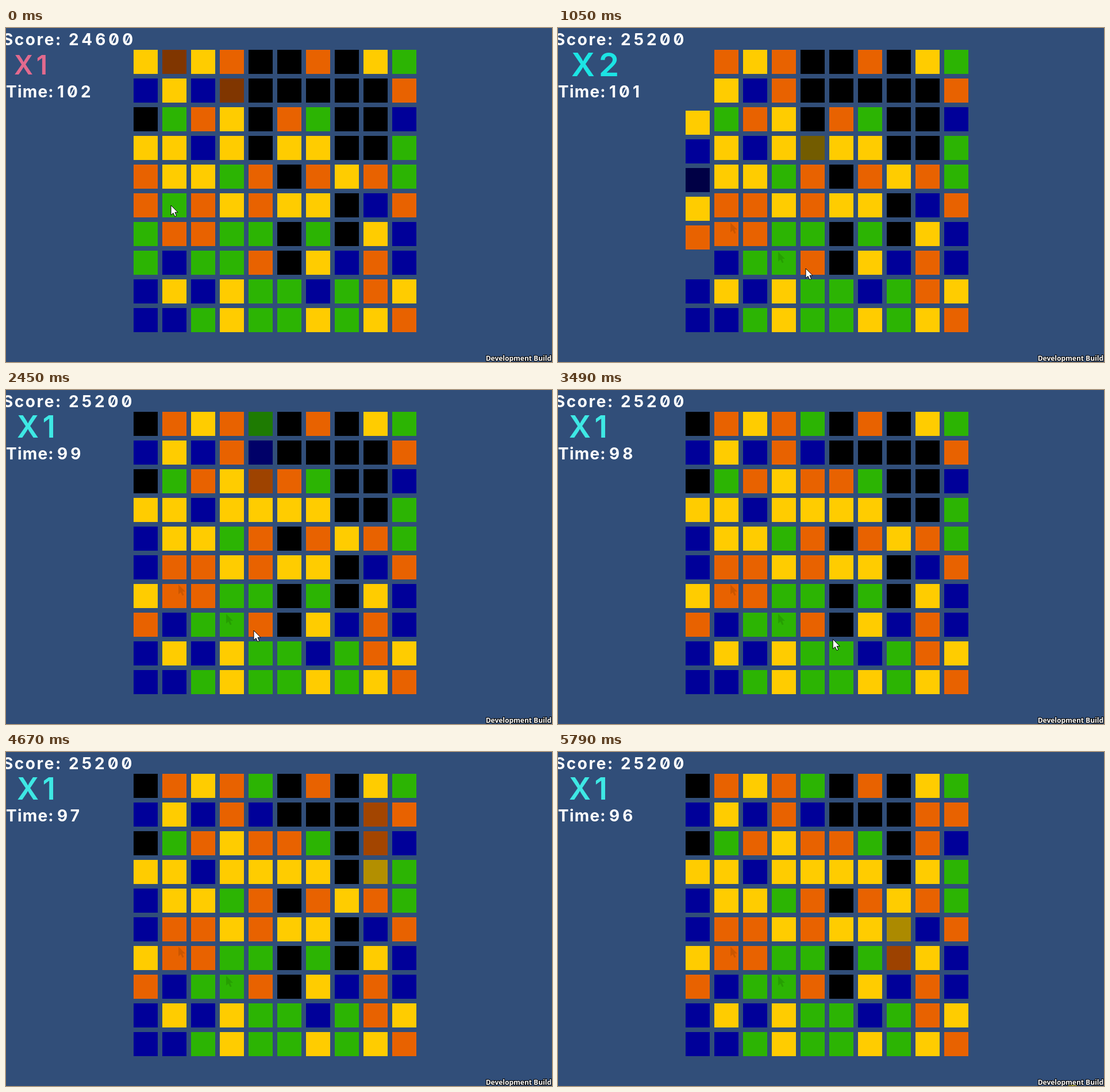
Recreate the animation shown at these times as an HTML page. Size 950x582 px, loop 5920 ms.

```html
<!DOCTYPE html>
<html>
<head>
<meta charset="utf-8">
<style>
  html, body { margin: 0; height: 100%; overflow: hidden; background: #314e79; }
  svg { display: block; width: 950px; height: 582px; }
  text { fill: #fff; font: 700 28px Inter, sans-serif; font-variant-numeric: slashed-zero; white-space: pre; }
  .label { letter-spacing: 2.5px; }
  .number { letter-spacing: 5px; }
  #combo { font-weight: 600; letter-spacing: .12em; }
  #build { font: 700 12px "Open Sans", sans-serif; text-anchor: end; paint-order: stroke; stroke: #000; stroke-width: 2px; }
</style>
</head>
<body>
<svg viewBox="0 0 950 582">
  <defs><path id="arrow" d="M0 0V17L4 13.4 6.8 19.5 9.6 18.3 7 12.2H12Z"/></defs>
  <g id="board"></g>
  <use id="trail1" href="#arrow" x="300" y="339" opacity=".12"/>
  <use id="trail2" href="#arrow" x="383" y="390" opacity=".12"/>
  <text class="label" x="-6" y="30">Score:</text>
  <text class="number" id="score" x="109" y="30"></text>
  <text id="combo"></text>
  <text class="label" x="0" y="121" style="letter-spacing:1.2px">Time:</text>
  <text class="number" id="time" x="89" y="121"></text>
  <circle id="glow" cx="895" cy="588" r="10" fill="#bebe3c"/>
  <text id="build" x="949" y="580">Development Build</text>
  <use id="cursor" href="#arrow" fill="#fff" stroke="#000"/>
</svg>
<script>
const LOOP = 5920, STEPS = 85, FADE = 1.61;
const COLORS = { Y: [255, 204, 0], O: [232, 98, 0], G: [44, 180, 3], B: [0, 0, 153], K: [0, 0, 0] };
const ROWS = [
  "YOYOGKOKYG", "BYBOBKKKOO", "BGOYOOGKOB", "YYBYYYYKYG", "OYYGOKOYOG",
  "OGOYOYYYBO", "GOOGGKGOYB", "GBGGOKYBOB", "BYBYGGBGOY", "BBGYGGYGYO"
];
// Cells that light up from black: start in seconds, first visible step, "column row" list
const FADES = [
  [-0.53, 10, ["1 0", "3 1"]],
  [0.627, 10, ["4 3", "0 2"]],
  [1.737, 31, ["4 0", "4 1", "4 2"]],
  [3.935, 57, ["8 1", "8 2", "8 3"]],
  [5.087, 74, ["7 5", "7 6"]]
];
// Cursor stops: step, x, y
const PATH = [
  [0, 287, 309], [2, 244, 309], [7, 244, 309], [8, 300, 339], [9, 383, 390], [10, 431, 419],
  [49, 431, 419], [54, 667, 495], [57, 667, 495], [60, 825, 561], [62, 868, 585], [85, 868, 600]
];

const $ = id => document.getElementById(id);
const clamp = (v, lo = 0, hi = 1) => Math.min(hi, Math.max(lo, v));
const set = (el, attrs) => { for (const k in attrs) el.setAttribute(k, attrs[k]); };
const show = (id, on) => set($(id), { visibility: on ? "visible" : "hidden" });

function addCell(col, row, letter) {
  const el = document.createElementNS("http://www.w3.org/2000/svg", "rect");
  set(el, { width: 42, height: 42 });
  $("board").append(el);
  const fade = FADES.find(f => f[2].includes(col + " " + row));
  return { el, col, row, color: COLORS[letter], fade };
}

const cells = ROWS.flatMap((line, row) => [...line].map((letter, col) => addCell(col, row, letter)));
const refill = [..."KBK"].map((letter, row) => ({ ...addCell(0, row, letter), fade: null }));

function brightness(fade, step, sec) {
  if (!fade) return 1;
  const [start, first] = fade;
  const u = clamp(((step < first ? 0 : sec) - start) / FADE);
  return 1 - (1 - u) ** 2;
}

function drawCell({ el, col, row, color, fade }, step, sec, dx = 0, dy = 0, opacity = 1) {
  const b = brightness(fade, step, sec);
  set(el, {
    x: 222 + col * 50 + dx, y: 38 + row * 50 + dy, opacity,
    fill: `rgb(${color.map(c => Math.round(c * b))})`
  });
}

function cursorAt(step) {
  const i = PATH.findIndex(p => p[0] > step);
  const [a, x, y] = PATH[i - 1], [b, x2, y2] = PATH[i];
  const u = (step - a) / (b - a);
  return { x: x + (x2 - x) * u, y: y + (y2 - y) * u };
}

function drawCombo(label, x, y, size, fill) {
  $("combo").textContent = label;
  set($("combo"), { x, y, style: `font-size:${size}px;fill:${fill}` });
}

function render(ms) {
  const step = Math.floor(ms % LOOP / LOOP * STEPS);
  const sec = step * LOOP / STEPS / 1000;
  const swap = 50 * clamp((step - 2) / 3);
  const clear = 1 - clamp((step - 6) / 3);
  const fall = step < 11 ? 0 : clamp(14 + 23 * (step - 11), 0, 150);

  for (const cell of cells) {
    const { col, row } = cell;
    const moved = row === 5 && col < 2;
    const matched = col === 0 && (row === 6 || row === 7) || col === 1 && row === 5;
    drawCell(cell, step, sec, moved ? (col ? -swap : swap) : 0,
      col === 0 && row < 5 ? fall : 0, matched ? clear : 1);
  }
  for (const cell of refill) drawCell(cell, step, sec, 0, 0, fall < 150 ? 0 : 1);

  $("score").textContent = step < 6 ? 24600 : 25200;
  $("time").textContent = 102 - Math.floor(sec + 0.8);
  if (step < 6) drawCombo("X1", 14, 81, 46, "#e26a8e");
  else if (step < 28) drawCombo("X2", 23, 84, 57, "#1ce4e4");
  else drawCombo("X1", 19, 83, 53, "#3ee8e4");

  set($("cursor"), cursorAt(step));
  show("trail1", step >= 9);
  show("trail2", step >= 10);
  show("glow", step >= 82);
}

const began = performance.now();
function tick() {
  render(performance.now() - began);
  requestAnimationFrame(tick);
}
tick();
</script>
</body>
</html>
```
